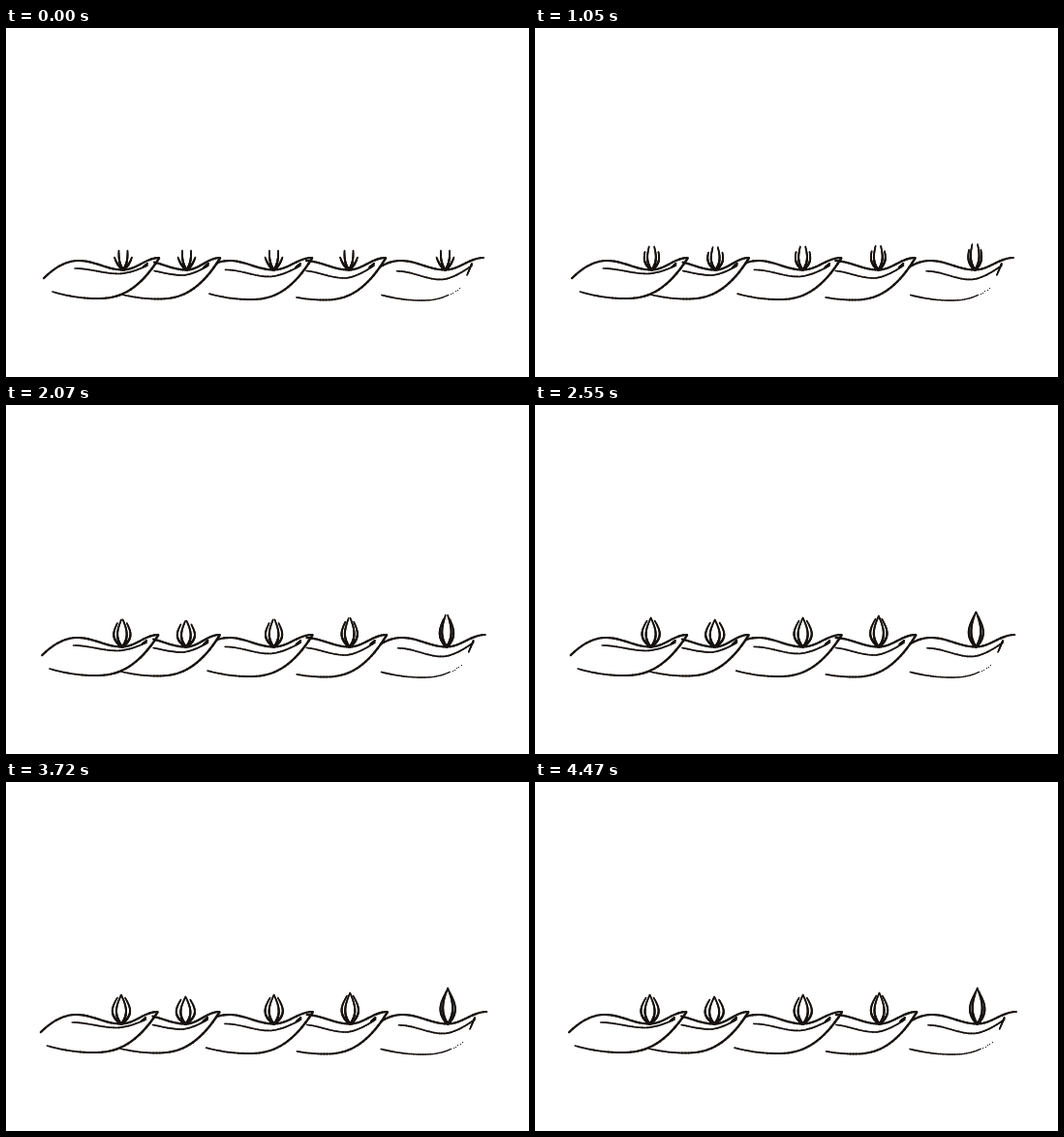
Recreate the animation shown at these times as an HTML page with a canvas. Size 540 by 360 pixels, loop 4500 ms.

```html
<!DOCTYPE html>
<html lang="en">
<head>
<meta charset="utf-8">
<title>Waves and flames</title>
<style>
html, body { margin: 0; width: 540px; height: 360px; overflow: hidden; background: #fff; }
canvas { display: block; }
</style>
</head>
<body>
<canvas id="stage" width="540" height="360"></canvas>
<script>
const LOOP = 4500, STEP = 30, CENTER = 265, INK = '#17120f';
const ctx = document.getElementById('stage').getContext('2d');
const waves = [
  { left: 39, foot: 48, root: 121, crest: 158, tall: 30 },
  { left: 153, foot: 120, root: 186.5, crest: 221, tall: 28 },
  { left: 219, foot: 210, root: 276.5, crest: 316, tall: 30 },
  { left: 310, foot: 300, root: 354, crest: 392, tall: 32 },
  { left: 386, foot: 388, root: 453.5, crest: 493, tall: 37 }
];

const mix = (a, b, p) => a + (b - a) * p;
const clamp = v => Math.max(0, Math.min(1, v));
const swell = (a, b, p) => mix(a, b, (1 - Math.cos(Math.PI * clamp(p))) / 2);
const widen = (x, spread) => CENTER + (x - CENTER) * (1 + .017 * spread);

// Draws curve(u), u from 0 to 1, with a pen that changes width.
function brush(curve, w0, w1) {
  const parts = 30;
  ctx.strokeStyle = INK;
  for (let k = 0; k < parts; k++) {
    ctx.lineWidth = mix(w0, w1, k / parts);
    ctx.beginPath();
    ctx.moveTo(...curve(k / parts));
    ctx.lineTo(...curve((k + 1) / parts));
    ctx.stroke();
  }
}

function drawWave({ left, foot, root, crest }, i, spread) {
  const last = i === waves.length - 1;
  const graph = (from, to, y, w0, w1, drift = 0) => brush(u => {
    const x = mix(from, to, u);
    return [widen(x, spread) + drift * spread * (1 - u), y(x)];
  }, w0, w1);

  // Back: hump, dip below the flame, then the crest
  const hump = root - 46;
  const back = x => x < hump ? 240 + .014 * (x - hump) ** 2
    : x < root ? swell(240, 249.5, (x - hump) / 46)
    : swell(249.5, 237, (x - root) / (crest - root));
  graph(left, crest, back, 2.2, 2.2);

  // Fold under the back, ending in a small hook
  const dip = root - 4, low = 253.5 + 1.5 * i, end = crest - 12;
  const fold = x => x < dip ? swell(248 + .7 * i, low, (x - dip + 46) / 46)
    : mix(low, 245, ((x - dip) / (end - dip)) ** 1.6);
  graph(Math.max(left, root - 50), end, fold, 1.6, 1.8);
  brush(u => [widen(end - 5 * u, spread), 243 + (last ? 12 : 4) * u], 1.8, 1.4);

  // Belly: shallow trough, then a steep rise to the crest
  const trough = crest - 64, floor = 279 + .5 * i;
  const belly = x => x < trough ? floor - .0033 * (x - trough) ** 2
    : floor - (floor - 237.5) * ((x - trough) / 64) ** 2.45;
  graph(foot, last ? crest - 36 : crest, belly, 1.7, last ? 1.2 : 2.5, i % 2 ? 0 : -3);
  if (last) {
    ctx.fillStyle = INK;
    for (let x = crest - 34; x < crest - 23; x += 2.3) {
      ctx.fillRect(Math.round(widen(x, spread)), Math.round(belly(x)), 1, 1);
    }
  }
}

function drawFlame({ root, tall }, time, spread) {
  const p = clamp((time - 60) / (1440 + 33 * tall));
  const blade = (side, bulge, tip, height) => brush(u => [
    widen(root, spread) + side * (bulge * Math.sin(Math.PI * u) + tip * u),
    249.5 - height * u ** 1.2
  ], 2.6, 1.6);
  for (const side of [-1, 1]) {
    blade(side, mix(1.5, 5, p), mix(4.5, 0, p), mix(20, tall, p));
    blade(side, mix(1, 7, p), mix(9, (40 - tall) / 2.5, p), mix(13, tall - 3, p));
  }
}

function draw(now) {
  const time = Math.floor(now % LOOP / STEP) * STEP;
  const spread = clamp((time - 60) / (LOOP - 90));
  ctx.fillStyle = '#fff';
  ctx.fillRect(0, 0, 540, 360);
  ctx.lineCap = 'round';
  waves.forEach((wave, i) => {
    drawWave(wave, i, spread);
    drawFlame(wave, time, spread);
  });
}

const start = performance.now();
function tick() {
  draw(performance.now() - start);
  requestAnimationFrame(tick);
}
tick();
</script>
</body>
</html>
```
